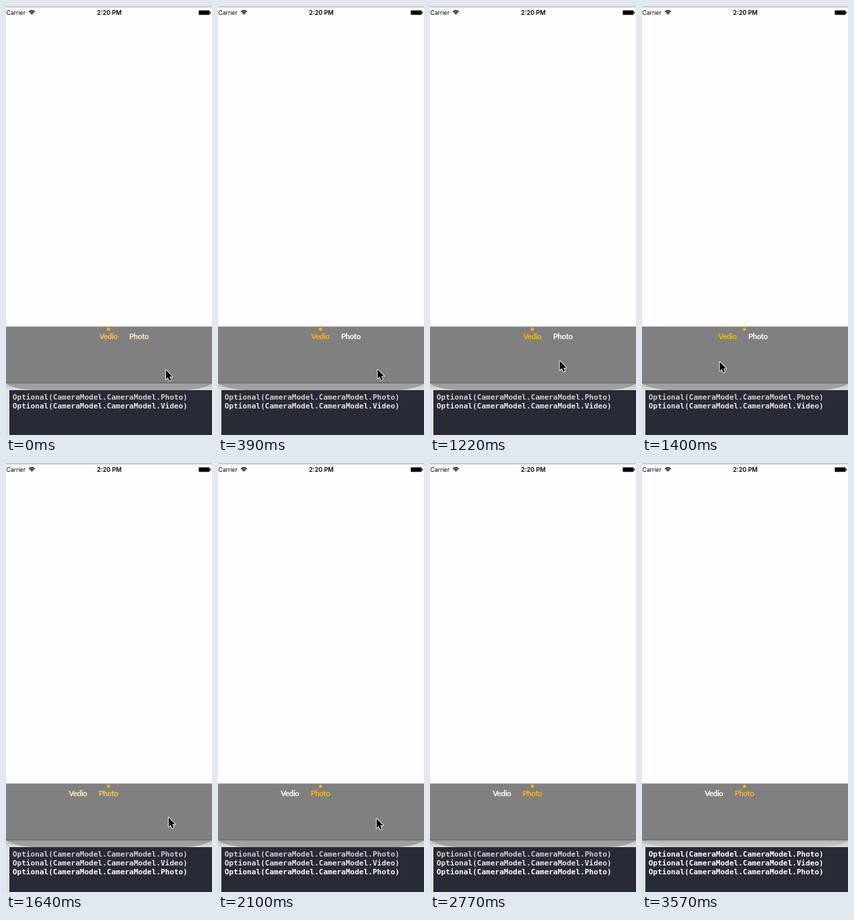
Animation, 304 px wide and 631 px high, one loop 3.66 s. Source, as an HTML page:

```html
<!DOCTYPE html>
<html lang="en">
<head>
<meta charset="utf-8">
<style>
  html, body { margin: 0; width: 100%; height: 100%; overflow: hidden; background: #fefefe; }
  svg { display: block; width: 304px; height: 631px; }
  text { white-space: pre; }
  .status { font: 8.6px Inter, sans-serif; }
  .clock { font: 600 9px Inter, sans-serif; text-anchor: middle; }
  .tab { font: 700 11.6px Lato, sans-serif; letter-spacing: -.5px; text-anchor: middle; }
  .log { font: 700 11px "DejaVu Sans Mono", monospace; }
</style>
</head>
<body>
<svg viewBox="0 0 304 631">
  <defs>
    <linearGradient id="desk" x1="0" y1="0" x2="0" y2="1">
      <stop offset="0" stop-color="#c0c2c0"/>
      <stop offset="1" stop-color="#dcdfdc"/>
    </linearGradient>
  </defs>

  <rect width="304" height="631" fill="#fefefe"/>
  <rect width="304" height="1" fill="#dcdcdc"/>
  <rect y="1" width="304" height="1" fill="#b8b8b8"/>

  <text class="status" x="0.5" y="13">Carrier</text>
  <g fill="none" stroke="#000" stroke-width="1.4">
    <path d="M33.8 8.7Q38.2 4.7 42.6 8.7M35.5 10.5Q38.2 8.1 40.9 10.5"/>
    <path d="M36.8 11.2Q38.2 10 39.6 11.2L38.2 12.8Z" fill="#000" stroke="none"/>
  </g>
  <text class="clock" x="152.4" y="13">2:20 PM</text>
  <rect x="284.5" y="6.5" width="16" height="6.5" rx="1.2" stroke="#777" stroke-width=".6"/>
  <rect x="301" y="8.3" width="1.2" height="2.8" rx=".6"/>

  <rect y="471" width="304" height="84" fill="#808080"/>
  <rect y="471" width="304" height="1" fill="#b8b8b8"/>
  <rect y="555" width="304" height="10" fill="url(#desk)"/>
  <path id="shadow" d="M0 555Q10 563 40 565H264Q294 563 304 555Z" fill="#8c8e8c"/>
  <rect y="554" width="304" height="1" fill="#656565"/>
  <rect y="565" width="304" height="66" fill="#282b35"/>
  <rect y="565" width="5" height="66" fill="#dfe4e0"/>

  <circle cx="151.2" cy="475.4" r="2.3" fill="#ffb400"/>
  <g id="tabs">
    <text class="tab" id="left" x="151" y="490">Vedio</text>
    <text class="tab" id="right" x="196" y="490">Photo</text>
  </g>

  <g id="log"></g>

  <path id="cursor" d="M1 1.5V15L4 12.2L6.2 17.2L8.6 16.2L6.4 11.3H10.6Z"
        fill="#000" stroke="#fff" stroke-width="1.8" stroke-linejoin="round" paint-order="stroke"/>
</svg>
<script>
const LOOP = 3660;
const CLEAN_AT = 3570;
const PRINT_AT = 1560;
const FADE = 280;
const ORANGE = [255, 180, 0], WHITE = [255, 255, 255];

const $ = id => document.getElementById(id);
const span = (t, a, b) => Math.max(0, Math.min(1, (t - a) / (b - a)));
const smooth = p => p * p * (3 - 2 * p);
const cubic = p => p ** 3;
const mix = (a, b, p) => a.map((v, i) => v + (b[i] - v) * p);
const rgb = c => `rgb(${c.map(Math.round)})`;

// Pointer moves: start, end, destination, easing
const moves = [
  { from: 330, to: 720, at: [228, 520] },
  { from: 1140, to: 1360, at: [106, 522] },
  { from: 1360, to: 1640, at: [239, 520] },
  { from: 1640, to: 1860, at: [265, 521] },
  { from: 1860, to: 2290, at: [84, 525], ease: cubic },
  { from: 2460, to: 2770, at: [271, 634] }
];

const pointer = t => moves.reduce(
  (pos, { from, to, at, ease = smooth }) => mix(pos, at, ease(span(t, from, to))),
  [235, 534]
);

const lines = ["Photo", "Video", "Photo"].map((name, i) => {
  const line = document.createElementNS("http://www.w3.org/2000/svg", "text");
  line.setAttribute("class", "log");
  line.setAttribute("x", 9.7);
  line.setAttribute("y", 579 + 13 * i);
  line.textContent = `Optional(CameraModel.CameraModel.${name})`;
  $("log").append(line);
  return line;
});

function draw(t) {
  $("cursor").setAttribute("transform", `translate(${pointer(t)})`);
  $("tabs").setAttribute("transform", `translate(${-45 * smooth(span(t, 1235, 1545))})`);

  // The fade to "Vedio" is already under way when the loop begins.
  const swiped = t >= 1430;
  const began = swiped ? 1430 : -210;
  const p = span(t, began, began + FADE);
  const on = rgb(mix(WHITE, ORANGE, p));
  const off = rgb(mix(ORANGE, WHITE, p));
  $("left").setAttribute("fill", swiped ? off : on);
  $("right").setAttribute("fill", swiped ? on : off);

  const clean = t >= CLEAN_AT;
  $("shadow").setAttribute("opacity", clean ? .25 : .7);
  lines.forEach((line, i) => {
    const tone = clean ? 255 : 207 + 24 * i;
    line.setAttribute("fill", rgb([tone, tone, tone]));
  });
  lines[2].setAttribute("visibility", t >= PRINT_AT ? "visible" : "hidden");
}

const start = performance.now();
function tick(now) {
  draw(Math.max(0, now - start) % LOOP);
  requestAnimationFrame(tick);
}
draw(0);
requestAnimationFrame(tick);
</script>
</body>
</html>
```
